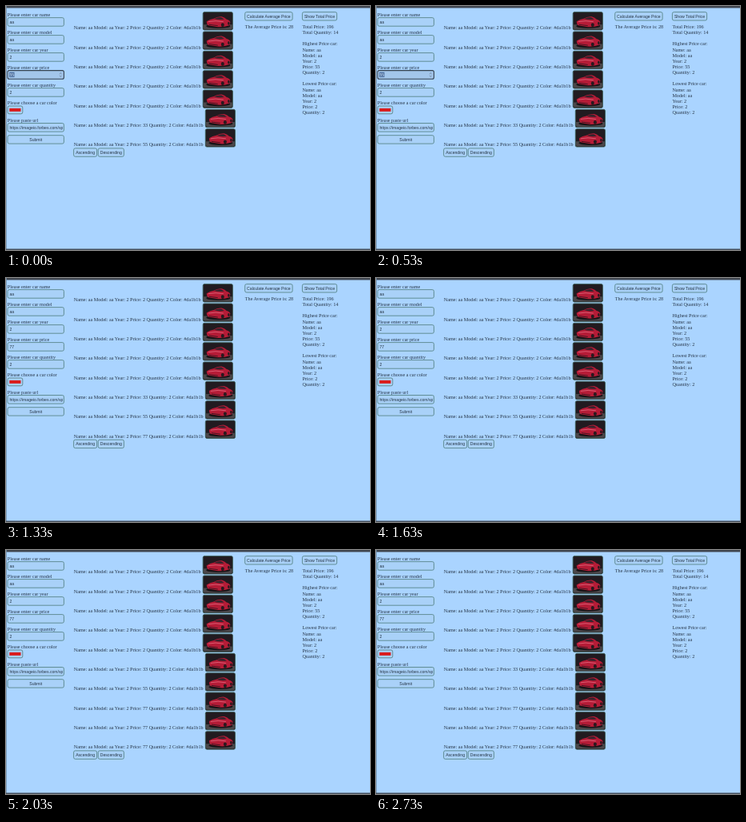
Recreate the animation shown at these times as an HTML page. Size 455 by 305 pixels, loop 3.03 s.

```html
<!DOCTYPE html>
<html lang="en">
<head>
<meta charset="utf-8">
<title>Car inventory form</title>
<style>
  html, body { margin: 0; width: 100%; height: 100%; overflow: hidden; background: #aad4ff; }
  svg { display: block; width: 455px; height: 305px; }
  text { font: 6.16px "Liberation Serif", "Times New Roman", serif; fill: #263546; white-space: pre; }
  .ui { font: 5.13px "Liberation Sans", Arial, sans-serif; }
  .mid { text-anchor: middle; }
  .box { fill: #a9d1f8; stroke: #4e7d7c; stroke-width: .8; }
  .focus { fill: #a3c6eb; stroke: #35424f; stroke-width: 1.1; }
</style>
</head>
<body>
<svg id="stage" viewBox="0 0 455 305">
  <defs>
    <clipPath id="urlClip"><rect x="3" y="146" width="68" height="11"/></clipPath>
    <g id="car">
      <rect x=".4" y=".4" width="37.2" height="22.4" rx="1.8" fill="#211b20" stroke="#3d5f59" stroke-width=".9"/>
      <path d="M1 16H37V20Q37 22 35 22H3Q1 22 1 20Z" fill="#4b474a"/>
      <ellipse cx="19.5" cy="18" rx="15" ry="2.6" fill="#171316"/>
      <path d="M5 12Q9 9 14 8.5Q18 5.5 24 6Q28 7 30 9.5Q34 10.5 34.5 13L33.5 17Q27 19.5 19 19L7 17Q4.500 15 5 12Z" fill="#b51c37"/>
      <path d="M14.500 8.800Q18.500 6.500 23.500 7L27 9.500Q20 10.500 14.500 8.800Z" fill="#38232c"/>
      <path d="M7 12.500Q16 10.500 26 12.500" fill="none" stroke="#e06379" stroke-width=".9"/>
      <path d="M8 16L19 17.500" stroke="#4a1522"/>
      <ellipse cx="25" cy="16.500" rx="2" ry="2.400" fill="#29181e"/>
      <ellipse cx="32.500" cy="14.500" rx="1.200" ry="2" fill="#29181e"/>
    </g>
  </defs>
  <rect width="455" height="305" fill="#aad4ff"/>
  <rect width="455" height="2.500" fill="#40464f"/>
  <rect width=".8" height="305" fill="#7292b0"/>
  <rect y="303.500" width="455" height="1.500" fill="#46515d"/>
</svg>
<script>
const LOOP = 3030;
const ROW_STEP = 24.35;
const TYPE_FIRST = 730, TYPE_SECOND = 830;
const SUBMITS = [1130, 1830, 1930];
const prices = [2, 2, 2, 2, 2, 33, 55, 77, 77, 77];
const stage = document.getElementById("stage");

function add(tag, attrs, parent = stage, content = "") {
  const node = document.createElementNS("http://www.w3.org/2000/svg", tag);
  for (const key in attrs) node.setAttribute(key, attrs[key]);
  node.textContent = content;
  return parent.appendChild(node);
}

const text = (x, y, content, cls = "", parent = stage) =>
  add("text", { x, y, class: cls }, parent, content);

const box = (x, y, width, height = 10.6, parent = stage) =>
  add("rect", { x, y, width, height, rx: 2, class: "box" }, parent);

function button(x, y, width, label, parent = stage) {
  box(x, y, width, 10.4, parent);
  text(x + width / 2, y + 7.1, label, "ui mid", parent);
}

const show = (node, visible) => node.setAttribute("visibility", visible ? "visible" : "hidden");

// Form
const labels = ["Please enter car name", "Please enter car model", "Please enter car year",
  "Please enter car price", "Please enter car quantity", "Please choose a car color", "Please paste url"];
labels.forEach((label, i) => text(1.8, 12.7 + i * 22, label));

const values = ["aa", "aa", "2", "55", "2"];
const fields = values.map((value, i) => ({
  frame: box(2, 14.6 + i * 22, 70.4),
  value: text(4.5, 21.8 + i * 22, value, "ui")
}));
const price = fields[3];

box(2, 125, 18.8, 9.8);
add("rect", { x: 4.3, y: 127.9, width: 14.2, height: 4, fill: "#da1b1b" });
box(2, 146.5, 70.4);
text(4.5, 153.7, "https://imageio.forbes.com/specials", "ui").setAttribute("clip-path", "url(#urlClip)");
button(2, 161.7, 70.4, "Submit");

const selection = add("rect", { x: 4.2, y: 82.8, width: 6.3, height: 6.2, fill: "#496b9c" });
stage.insertBefore(selection, price.value);
const caret = add("path", { d: "M10.700 83V89", stroke: "#263546", "stroke-width": .5 });
const spinner = add("path", { d: "M67 85.300L68.300 83.500L69.600 85.300M67 86.800L68.300 88.600L69.600 86.800",
  fill: "none", stroke: "#66788b", "stroke-width": .6 });

// Car list
const rows = prices.map((amount, i) => {
  const row = add("g", { transform: `translate(0 ${i * ROW_STEP})` });
  text(84.8, 29.2, `Name: aa Model: aa Year: 2 Price: ${amount} Quantity: 2 Color: #da1b1b`, "", row);
  add("use", { href: "#car", x: amount > 9 ? 248.9 : 245.8, y: 7.2 }, row);
  return row;
});
const sorting = add("g", {});
button(84.6, 7.4, 29, "Ascending", sorting);
button(115.2, 7.4, 32.2, "Descending", sorting);

// Totals
button(298.7, 7.6, 59.4, "Calculate Average Price");
text(298.8, 27.9, "The Average Price is: 28");
button(370.4, 7.6, 43.2, "Show Total Price");
const carLines = amount => ["Name: aa", "Model: aa", "Year: 2", `Price: ${amount}`, "Quantity: 2"];
["Total Price: 196", "Total Quantity: 14", "", "Highest Price car:", ...carLines(55),
  "", "Lowest Price car:", ...carLines(2)
].forEach((line, i) => text(370.4, 27.9 + i * 7.15, line));

function draw() {
  const t = performance.now() % LOOP;
  const count = 7 + SUBMITS.filter(time => t >= time).length;
  const selected = t < TYPE_FIRST;
  const focused = t < SUBMITS[0];

  price.frame.setAttribute("class", focused ? "box focus" : "box");
  price.value.textContent = selected ? "55" : t < TYPE_SECOND ? "7" : "77";
  price.value.style.fill = selected ? "#d7e8fa" : "";
  show(selection, selected);
  show(spinner, focused);
  show(caret, focused && t >= TYPE_SECOND);
  rows.forEach((row, i) => show(row, i < count));
  sorting.setAttribute("transform", `translate(0 ${count * ROW_STEP})`);
  requestAnimationFrame(draw);
}
draw();
</script>
</body>
</html>
```
